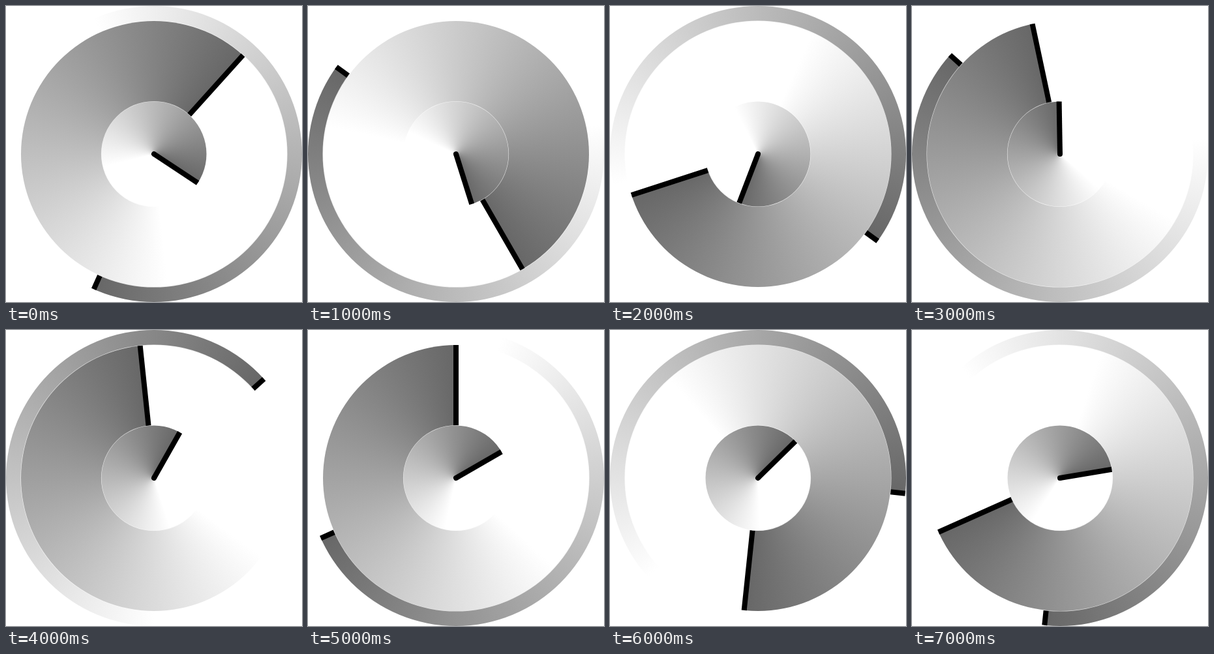
An HTML page with a canvas that plays this animation: 454x454 px, repeating every 8000 ms.

```html
<!DOCTYPE html>
<html lang="en">
<head>
<meta charset="utf-8">
<title>Gradient clock</title>
<style>
  html, body { margin: 0; width: 100%; height: 100%; overflow: hidden; background: #fff; }
  canvas { display: block; }
</style>
</head>
<body>
<canvas id="clock" width="454" height="454"></canvas>
<script>
const ctx = document.getElementById('clock').getContext('2d');
const STEP = 1000, C = 227, TAU = Math.PI * 2;
const FADE = 228 / 360; // share of the turn covered by the shadow
const RADII = { hour: 80.5, minute: 204, second: 227 };

// hour, minute, second shown during each step
const times = [
  [4, 7, 34], [5, 25, 51], [6, 42, 21], [11, 58, 52],
  [12, 59, 8], [2, 0, 41], [1, 31, 16], [2, 41, 31]
];

function disc(radius, fill) {
  ctx.beginPath();
  ctx.arc(C, C, radius, 0, TAU);
  ctx.fillStyle = fill;
  ctx.fill();
}

function ring(turn, inner, outer) {
  const angle = turn * TAU - TAU / 4;
  const shade = ctx.createConicGradient(angle, C, C);
  shade.addColorStop(0, '#fff');
  shade.addColorStop(1 - FADE, '#fff');
  shade.addColorStop(1, '#676767');
  disc(outer + 0.6, 'rgba(255,255,255,.75)');
  disc(outer, shade);

  ctx.save();
  ctx.translate(C, C);
  ctx.rotate(angle);
  ctx.fillStyle = '#000';
  ctx.fillRect(inner, -4, outer - inner, 8);
  if (!inner) {
    ctx.beginPath();
    ctx.arc(0, 0, 4, 0, TAU);
    ctx.fill();
  }
  ctx.restore();
}

function draw([h, m, s]) {
  ctx.fillStyle = '#fff';
  ctx.fillRect(0, 0, 454, 454);
  ring(s / 60, RADII.minute, RADII.second);
  ring(m / 60, RADII.hour, RADII.minute);
  ring((h + m / 60) / 12, 0, RADII.hour);
}

const start = performance.now();
let shown = -1;
function tick() {
  const step = Math.floor((performance.now() - start) / STEP) % times.length;
  if (step !== shown) draw(times[shown = step]);
  requestAnimationFrame(tick);
}
tick();
</script>
</body>
</html>
```
